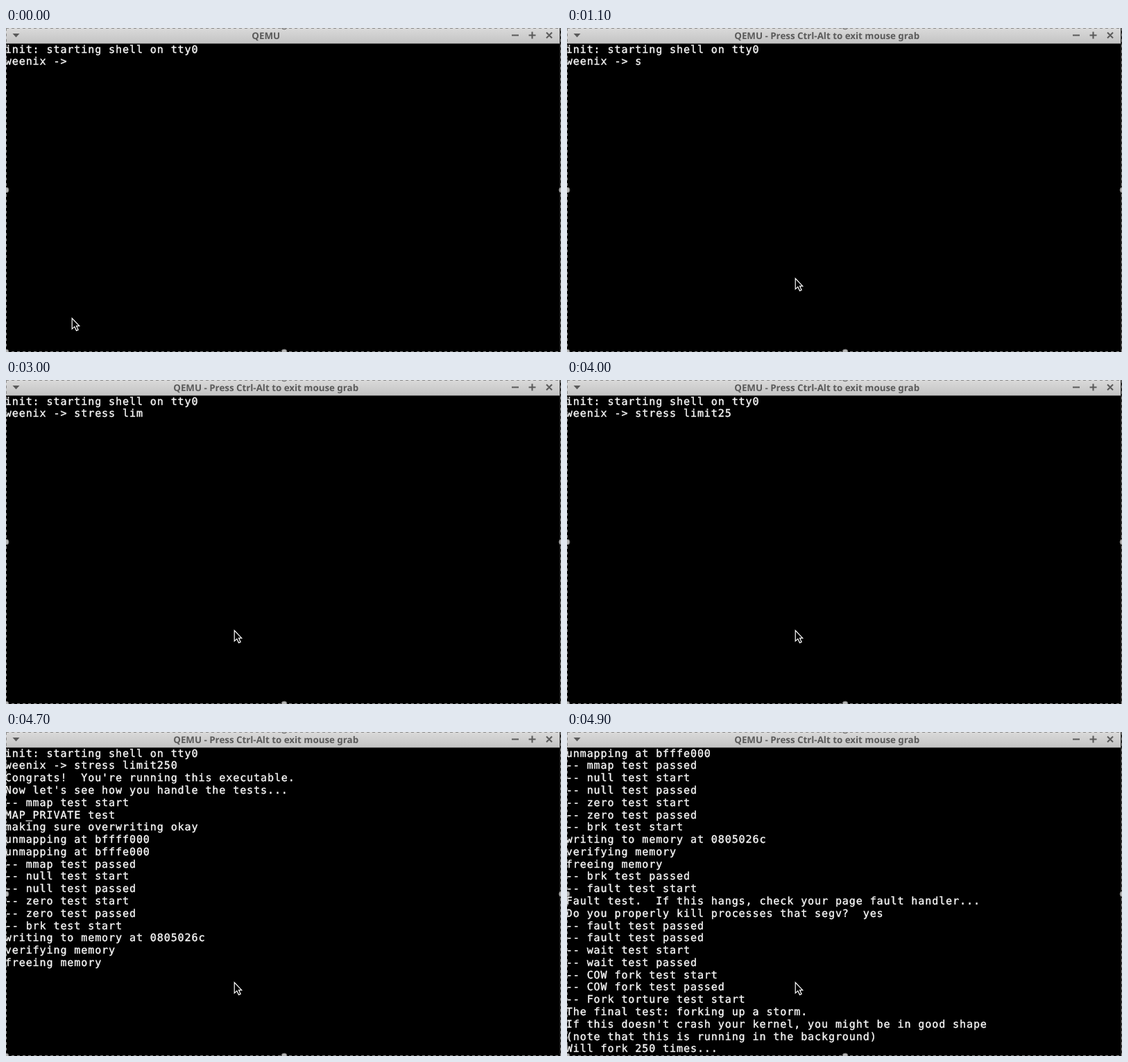
Write an HTML page that moves like this. It is 800x468 px and loops after 5000 ms.

```html
<!DOCTYPE html>
<html lang="en">
<head>
<meta charset="utf-8">
<title>Terminal</title>
<style>
  html, body { margin: 0; width: 100%; height: 100%; overflow: hidden; background: #000; }
  svg { display: block; width: 800px; height: 468px; }
  #screen text {
    font: 15px "DejaVu Sans Mono", monospace;
    letter-spacing: calc(9.95px - .602em);
    white-space: pre;
    text-rendering: geometricPrecision;
    fill: #f6f6f6; stroke: #f6f6f6; stroke-width: .4px;
  }
  #title {
    font: bold 13.33px "Noto Sans", "Open Sans", sans-serif;
    text-rendering: geometricPrecision;
    text-anchor: middle; fill: #5a5a5a;
  }
  .icons { fill: none; stroke: #5a5a5a; stroke-width: 2.1; }
  .dash { fill: none; stroke: #8a8a8a; stroke-dasharray: 4 4; }
  .grips { fill: #b4b4b4; stroke: #6c6c6c; }
</style>
</head>
<body>
<svg viewBox="0 0 800 468">
  <defs>
    <linearGradient id="bar" x2="0" y2="1">
      <stop offset="0" stop-color="#dadada"/>
      <stop offset="1" stop-color="#c3c3c3"/>
    </linearGradient>
  </defs>
  <rect width="800" height="468"/>
  <rect width="798" height="22.5" fill="url(#bar)"/>
  <path d="M9.5 8H19.5L14.5 13.5Z" fill="#5a5a5a"/>
  <path class="icons" d="M729 10.5H739M753.5 10.5H763.5M758.5 5.5V15.5M779 6.5L787 14.5M787 6.5L779 14.5"/>
  <text id="title" x="374.7" y="15.8"></text>
  <g id="screen"></g>
  <path d="M799 0V468" stroke="#555"/>
  <path class="dash" d="M0 .5H800M.5 0V468M799.5 0V468M0 467.5H800"/>
  <g class="grips">
    <circle cx="0" cy="234" r="4"/>
    <circle cx="801" cy="234" r="4"/>
    <circle cx="401" cy="468" r="4"/>
    <circle cx="0" cy="468" r="4"/>
    <circle cx="401" cy="-2" r="4"/>
  </g>
  <path id="pointer" d="M.7 .8V16.2L4.3 12.9L7 18.6L9.6 17.5L7 11.8H11.2Z" fill="#000" stroke="#fff" stroke-width="1.2"/>
</svg>
<script>
const LOOP = 5000, STEP = 100, ROWS = 25, PITCH = 17.78;
const COMMAND = "stress limit250";
// [time, characters typed]
const KEYS = [[1100, 1], [1400, 2], [1600, 3], [1800, 4], [2000, 5], [2300, 6],
  [2500, 7], [2600, 8], [2800, 9], [3000, 10], [3200, 11], [3400, 12],
  [3700, 13], [4000, 14], [4200, 15]];

const intro = `Congrats!  You're running this executable.
Now let's see how you handle the tests...
-- mmap test start
MAP_PRIVATE test`.split("\n");

const memoryTests = `making sure overwriting okay
unmapping at bffff000
unmapping at bfffe000
-- mmap test passed
-- null test start
-- null test passed
-- zero test start
-- zero test passed
-- brk test start
writing to memory at 0805026c
verifying memory
freeing memory`.split("\n");

const faultTests = `-- brk test passed
-- fault test start
Fault test.  If this hangs, check your page fault handler...
Do you properly kill processes that segv?  yes
-- fault test passed`.split("\n");

const forkTests = `-- wait test start
-- wait test passed
-- COW fork test start
-- COW fork test passed
-- Fork torture test start
The final test: forking up a storm.
If this doesn't crash your kernel, you might be in good shape
(note that this is running in the background)`.split("\n");

const screen = document.getElementById("screen");
const title = document.getElementById("title");
const pointer = document.getElementById("pointer");

const rows = Array.from({ length: ROWS }, (_, i) => {
  const row = document.createElementNS("http://www.w3.org/2000/svg", "text");
  row.setAttribute("x", -1.2);
  row.setAttribute("y", (35.6 + i * PITCH).toFixed(2));
  return screen.appendChild(row);
});

function setText(node, text) {
  if (node.textContent !== text) node.textContent = text;
}

function linesAt(t) {
  const typed = KEYS.reduce((n, [at, count]) => t >= at ? count : n, 0);
  const lines = ["init: starting shell on tty0", "weenix -> " + COMMAND.slice(0, typed)];
  if (t >= 4600) lines.push(...intro);
  if (t >= 4700) lines.push(...memoryTests);
  if (t >= 4800) lines.push(...faultTests);
  if (t >= 4900) lines.push("-- fault test passed");
  if (t >= 4800) lines.push(...forkTests);
  if (t >= 4900) lines.push("Will fork 250 times...");
  return lines.slice(-ROWS);
}

function draw(t) {
  const lines = linesAt(t);
  rows.forEach((row, i) => setText(row, lines[i] || ""));
  setText(title, t < 700 ? "QEMU" : "QEMU - Press Ctrl-Alt to exit mouse grab");
  const p = Math.min(t / 600, 1), ease = p * p * (3 - 2 * p);
  pointer.setAttribute("transform", `translate(${94.5 + 234 * ease} ${418.5 - 57.5 * ease})`);
}

const start = performance.now();
function tick() {
  const t = (performance.now() - start) % LOOP;
  draw(Math.floor(t / STEP) * STEP);
  requestAnimationFrame(tick);
}
tick();
</script>
</body>
</html>
```
